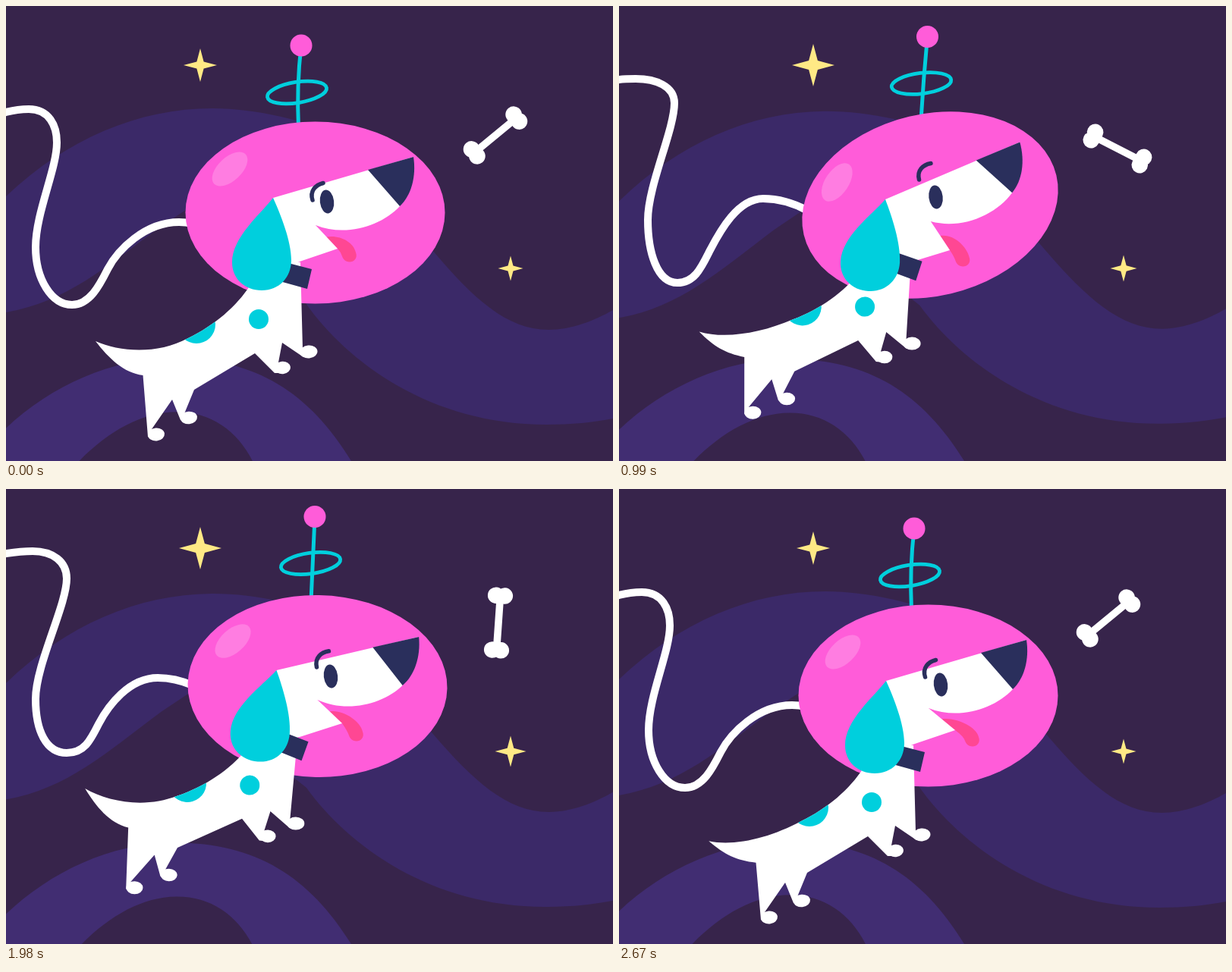
An HTML page with a canvas for the animation above (2.7 s loop, 800x600 px).

```html
<!DOCTYPE html>
<html lang="en">
<head>
<meta charset="utf-8">
<title>Space dog</title>
<style>
  html, body { margin: 0; width: 100%; height: 100%; overflow: hidden; background: #37244b; }
  canvas { display: block; width: 800px; height: 600px; }
</style>
</head>
<body>
<canvas id="stage" width="800" height="600"></canvas>
<script>
const ctx = document.getElementById('stage').getContext('2d');
const LOOP = 2700, STEP = 30, SPAN = LOOP - STEP;
const KEYS = [0, 480, 990, 1500, 1980, 2430, SPAN];
const WHITE = '#fff', PINK = '#ff5cd9', TEAL = '#00cfdd', NAVY = '#2a2f5c';
const RAD = Math.PI / 180;

// Six values make a cyclic track, seven an open one that jumps at the loop.
const tracks = {
  lift: [0, .2, .63, 1, .85, .19],
  tail: [0, -7.6, -11.8, -9.4, -.4, -12.8, -11.6],
  helmX: [407.5, 408, 410, 411, 410.5, 408],
  helmY: [272.5, 269, 262.5, 257.5, 260, 270],
  helmRot: [0, -16.2, -13.3, -4.6, 1, .5],
  headX: [352, 350, 351, 355, 356.5, 353],
  headY: [253, 264, 255, 241, 239, 250],
  headRot: [0, -10, -6.8, 0, 3.1, 1],
  jawX: [437, 435, 436, 440, 443, 443, 443],
  jawY: [320, 332, 322, 313, 309, 317, 318],
  chinY: [337, 344, 337, 328, 327, 335],
  tongueX: [452, 448, 452.5, 455.5, 461, 464, 465],
  tongueY: [328, 336, 334, 326, 323, 329, 330],
  eyeX: [423, 414.5, 417.5, 425, 428, 425, 424],
  eyeY: [258, 258, 252, 246, 247, 256, 258],
  browX: [404, 388.5, 395.5, 408.5, 409.5, 405, 403.5],
  browY: [256, 233.5, 229, 231, 235, 246, 248],
  ballX: [389, 380, 406.5, 414, 407, 402],
  ballY: [52, 47, 40.5, 34, 36.5, 51],
  rodX: [385.5, 389, 398, 405, 402, 389.5],
  rodBend: [-4.4, 0, -1, 0, 0, -8],
  ringX: [383.5, 384, 398.5, 406.5, 401.5, 390],
  ringY: [114, 109, 102, 95.5, 98, 111.5],
  ringRot: [-9, -15, -7, -6, -8, -4],
  boneX: [645, 653, 657, 653, 649, 645.5],
  boneY: [170.5, 182.5, 188, 183, 176.5, 171.5],
  starA: [22, 24, 28, 22, 28, 25],
  starB: [16.5, 20.5, 17.5, 19, 20.5, 16.5]
};

// Tether: [x track, y track] for each bend, left to right.
const tether = [
  [[0, 0, 0, 0, 0, 0], [140, 127, 97, 74, 85, 129]],
  [[30, 28, 22, 30, 35, 32], [136, 125, 96, 72, 82, 126]],
  [[67, 68, 73, 82, 80, 69], [180, 162, 128, 108, 118, 165]],
  [[39, 38, 38, 38, 39, 38], [318, 303, 282, 270, 277, 305]],
  [[87, 83, 77, 76, 80, 85], [394, 385, 365, 343, 348, 384]],
  [[134, 127, 120, 117, 122, 130], [347, 342, 322, 305, 310, 344]],
  [[228, 212, 190, 188, 200, 225], [285, 277, 254, 240, 249, 280]],
  [[246, 247, 249, 248, 246, 246], [287, 283, 270, 255, 259, 282]]
];

// Smooth curve through the key values.
function sample(v, t) {
  const cyclic = v.length === 6;
  const val = i => cyclic ? v[(i + 6) % 6] : v[i];
  const key = i => i < 0 ? KEYS[i + 6] - SPAN : i > 6 ? KEYS[i - 6] + SPAN : KEYS[i];
  const slope = i => {
    const a = cyclic ? i - 1 : Math.max(0, i - 1);
    const b = cyclic ? i + 1 : Math.min(6, i + 1);
    return (val(b) - val(a)) / (key(b) - key(a));
  };
  let i = 0;
  while (i < 5 && t >= KEYS[i + 1]) i++;
  const d = KEYS[i + 1] - KEYS[i], u = (t - KEYS[i]) / d, w = 1 - u;
  return val(i) * w * w * (1 + 2 * u) + val(i + 1) * u * u * (3 - 2 * u)
    + d * u * w * (slope(i) * w - slope(i + 1) * u);
}

const wave = (t, lag) => (1 - Math.cos((t - lag) / SPAN * 2 * Math.PI)) / 2;

function turn(x, y, deg) {
  const c = Math.cos(deg * RAD), s = Math.sin(deg * RAD);
  return [x * c - y * s, x * s + y * c];
}

function group(x, y, deg, draw) {
  ctx.save();
  ctx.translate(x, y);
  ctx.rotate(deg * RAD);
  draw();
  ctx.restore();
}

// Rotates artwork that is drawn in stage coordinates.
const pivot = (x, y, deg, draw) => group(x, y, deg, () => { ctx.translate(-x, -y); draw(); });

function fill(d, color) {
  ctx.fillStyle = color;
  ctx.fill(typeof d === 'string' ? new Path2D(d) : d);
}

function line(d, color, width) {
  ctx.strokeStyle = color;
  ctx.lineWidth = width;
  ctx.stroke(new Path2D(d));
}

function oval(x, y, rx, ry, deg, color) {
  const p = new Path2D();
  p.ellipse(x, y, rx, ry, deg * RAD, 0, 2 * Math.PI);
  fill(p, color);
}

const dot = (x, y, r, color) => oval(x, y, r, r, 0, color);

function star(x, y, r) {
  const k = r * .21;
  group(x, y, 0, () => fill(
    `M0 ${-r}L${k} ${-k}L${r} 0L${k} ${k}L0 ${r}L${-k} ${k}L${-r} 0L${-k} ${-k}Z`, '#ffe985'));
}

function background(t) {
  ctx.fillStyle = '#37244b';
  ctx.fillRect(0, 0, 800, 600);
  pivot(600, 300, -.85 * wave(t, 60), () => fill(
    'M-20 268L0 251C80 175 175 135 272 135C330 135 400 152 430 170C480 205 520 272 562 322' +
    'C615 385 660 427 715 427C745 427 775 415 800 401L820 391V540L800 544C775 549 745 552 712 552' +
    'C560 552 450 470 395 392L240 267L205 290C130 345 80 390 0 404L-20 408Z', '#3b2968'));
  pivot(455, 600, -.75 * wave(t, 300), () => fill(
    'M-20 575L0 556C60 500 140 464 220 464C330 464 400 510 455 600L468 622H334L325 600' +
    'C305 560 270 535 225 535C180 535 135 560 96 600L76 622H-20Z', '#412d72'));
}

function cord(t) {
  const [a, p, b, c, d, m, e, g] = tether.map(([x, y]) => [sample(x, t), sample(y, t)]);
  const k = (e[0] - m[0]) * .48;
  line(`M-10 ${a[1] + 3}L${a}Q${p[0] - 15} ${p[1]} ${p}` +
    `C${p[0] + 27} ${p[1]} ${b[0]} ${b[1] - 22} ${b}` +
    `C${b[0]} ${b[1] + 35} ${c[0]} ${c[1] - 45} ${c}` +
    `C${c[0]} ${c[1] + 42} ${d[0] - 27} ${d[1]} ${d}` +
    `C${d[0] + 23} ${d[1]} ${m[0] - 11} ${m[1] + 22} ${m}` +
    `C${m[0] + 13} ${m[1] - 25} ${e[0] - k} ${e[1]} ${e}` +
    `Q${(e[0] + g[0]) / 2} ${e[1]} ${g}`, WHITE, 10);
}

function helmet(s) {
  const baseY = s.helmY - 112;
  line(`M${s.rodX} ${baseY}Q${(s.rodX + s.ballX) / 2 + s.rodBend} ${(baseY + s.ballY) / 2} ${s.ballX} ${s.ballY}`,
    TEAL, 5);
  group(s.ringX, s.ringY, s.ringRot, () =>
    line('M-39.5 0A39.5 13.7 0 0 1 39.5 0A39.5 13.7 0 0 1 -39.5 0Z', TEAL, 4.8));
  dot(s.ballX, s.ballY, 14.5, PINK);
  group(s.helmX, s.helmY, s.helmRot, () => {
    oval(0, 0, 171, 120, 0, PINK);
    oval(-112.5, -57.5, 28.5, 15.5, -43, '#ff7de1');
  });
}

function body(s) {
  const a = s.tail;
  const r = turn(-110, -10, a), tip = [228 + r[0], 452 + r[1]];
  const at = (x, y) => { const q = turn(x, y, a); return [tip[0] + q[0], tip[1] + q[1]]; };
  const hipY = 487 - a * .5;
  const shape = new Path2D(
    `M${tip}C${at(32, 14)} 199 460 240 438C275 421 304 396 322 368L350 328L388 338` +
    'L391 452L399 463L392 463L364 444L359 470L365 484L354 484L328 458L248 506L234 540L240 550' +
    `L230 546L219 519L192 558L197 572L187 568L180.5 ${hipY}C155 ${hipY - 3} ${at(17, 22)} ${tip}Z`);
  fill(shape, WHITE);
  oval(198, 565, 11, 8.5, -6, WHITE);
  oval(241, 543, 11, 8.3, -6, WHITE);
  oval(364.5, 477, 10.5, 8.3, -6, WHITE);
  oval(399, 456, 11.5, 8.5, -6, WHITE);
  dot(333, 413, 13, TEAL);
  ctx.save();
  ctx.clip(shape);
  dot(251, 420, 25, TEAL);
  ctx.restore();
}

function head(s) {
  const q = turn(56, 36, s.headRot);
  const cx = s.headX + q[0], cy = s.headY + q[1];
  const { jawX: jx, jawY: jy, tongueX: kx, tongueY: ky } = s;
  const rx = (cx + jx) / 2, ry = (cy + jy) / 2;
  fill(`M${rx} ${ry}C${rx + 17} ${ry - 3} ${kx + 6} ${ky - 17} ${kx + 9} ${ky - 3}` +
    `C${kx + 12} ${ky + 5} ${kx + 6} ${ky + 9.5} ${kx + 1} ${ky + 9.5}` +
    `C${kx - 5} ${ky + 9.5} ${kx - 8} ${ky + 5} ${kx - 9} ${ky + 2}` +
    `Q${kx - 11} ${ky - 4} ${jx} ${jy}Z`, '#ff4793');
  fill(`M${s.headX} ${s.headY}L${cx} ${cy}L${jx} ${jy}L387 ${s.chinY}L365 ${s.chinY + 3}Z`, WHITE);
  group(s.headX, s.headY, s.headRot, () => {
    ctx.translate(-352, -253);
    fill('M352 253L537 199L519 264C495 290 448 305 408 289L375 315L360 300Z', WHITE);
    fill('M477 216L537 199C541 225 534 250 519 264Z', NAVY);
  });
  oval(s.eyeX, s.eyeY, 9.2, 15.5, -7, NAVY);
  group(s.browX, s.browY, 6 * s.lift, () => line('M0 0C-4 -12 4 -20 14 -22.5', NAVY, 5.5));
}

function collar() {
  fill('M372 339L403 347L397 373L361 363Z', NAVY);
}

function ear(s) {
  group(s.headX, s.headY, 5.4 * s.lift, () => fill(
    'M0 0C-17 22 -54 52 -54 85C-54 107 -37 122 -15 122C8 122 24 105 24 82C24 57 10 22 0 0Z', TEAL));
}

function bone(s, t) {
  group(s.boneX, s.boneY, -39.5 + 180 * t / SPAN, () => {
    line('M-34 0H34', WHITE, 9.6);
    for (const x of [-36, 36]) for (const y of [-5.8, 5.8]) dot(x, y, 10.8, WHITE);
  });
}

function render(t) {
  const s = {};
  for (const name in tracks) s[name] = sample(tracks[name], t);
  const withBody = draw => pivot(518, 302, 7.9 * s.lift, draw);
  background(t);
  star(256, 78, s.starA);
  star(665, 346, s.starB);
  bone(s, t);
  cord(t);
  helmet(s);
  withBody(() => body(s));
  head(s);
  withBody(collar);
  ear(s);
}

ctx.lineCap = 'round';
ctx.lineJoin = 'round';
let start;
function tick(now) {
  if (start === undefined) start = now;
  const t = Math.max(0, now - start) % LOOP;
  render(Math.floor(t / STEP) * STEP);
  requestAnimationFrame(tick);
}
render(0);
requestAnimationFrame(tick);
</script>
</body>
</html>
```
